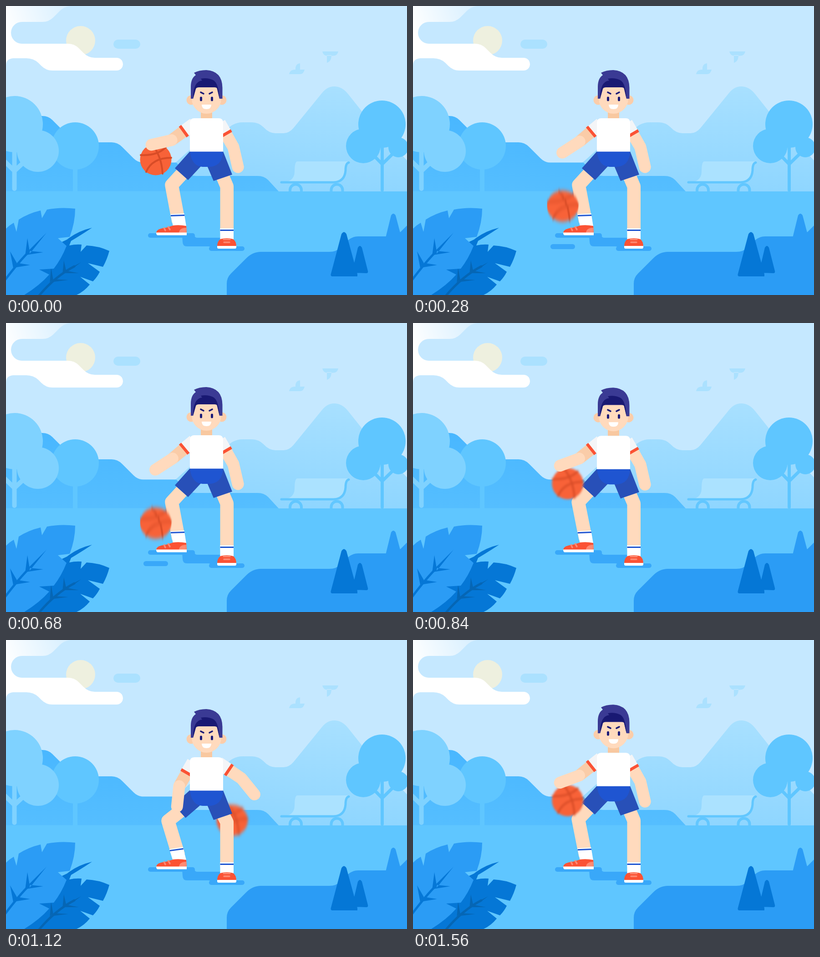
These frames come from a looping animation (881x636 px, 1600 ms). An HTML page:

```html
<!DOCTYPE html>
<html lang="en">
<head>
<meta charset="utf-8">
<title>Dribble</title>
<style>
  html, body { margin: 0; width: 100%; height: 100%; overflow: hidden; background: #c5e8ff; }
  svg { display: block; width: 100%; height: 100%; }
  .line { fill: none; stroke-linecap: round; stroke-linejoin: round; }
  .leg { fill: none; stroke: #ffdabd; stroke-width: 29.5; stroke-linejoin: round; }
</style>
</head>
<body>
<svg viewBox="0 0 881 636">
  <defs>
    <linearGradient id="haze" gradientUnits="userSpaceOnUse" x1="0" y1="50" x2="140" y2="0">
      <stop stop-color="#fff"/><stop offset="1" stop-color="#fff" stop-opacity=".3"/>
    </linearGradient>
    <linearGradient id="far" gradientUnits="userSpaceOnUse" x1="0" y1="177" x2="0" y2="407">
      <stop stop-color="#a8e0ff"/><stop offset="1" stop-color="#8fd6ff"/>
    </linearGradient>
    <linearGradient id="near" gradientUnits="userSpaceOnUse" x1="0" y1="242" x2="0" y2="407">
      <stop stop-color="#49b7ff"/><stop offset="1" stop-color="#55beff"/>
    </linearGradient>
    <filter id="smear" x="-40%" y="-40%" width="180%" height="180%" color-interpolation-filters="sRGB">
      <feGaussianBlur id="blur" stdDeviation="0"/>
    </filter>
  </defs>

  <!-- sky -->
  <path fill="#c5e8ff" d="M0 0H881V636H0Z"/>
  <circle cx="164" cy="76" r="32" fill="#eef0df"/>
  <path fill="url(#haze)" d="M0 0H141Q127 2 118 11L104 25Q94 35 80 35H35A24 24 0 0 0 11 59H0Z"/>
  <path fill="#fff" d="M0 59H11A24 24 0 0 0 35 83H137Q150 83 160 93L170 103Q181 114 195 114H243A14 14 0 0 1 243 142H102Q88 142 78 132L71 125Q60 115 45 115H16Q0 116 0 131Z"/>
  <g fill="#abe1ff">
    <rect x="236" y="74" width="59" height="20" rx="10"/>
    <path d="M622 150Q624 140 634 140H656Q654 150 645 150ZM636 142V136Q637 127 646 126V142Z"/>
    <path d="M695 100H730Q728 109.500 719 109.500H705Q697 109 695 100ZM705 108V125Q715 122 715 108Z"/>
  </g>

  <!-- hills -->
  <path fill="url(#far)" d="M330 407V380L372 345L410 311L486 271Q500 256 520 256H540Q555 256 566 267Q578 280 592 280H610Q622 280 632 268L693 193Q705 177 721 177Q738 177 751 193L782 232L881 340V407Z"/>
  <path fill="url(#near)" d="M0 242H80Q93 242 102 251L118 267L150 300H232Q245 300 255 310L280 335Q289 344.500 302 344.500H374L396 365Q405 374 418 374H553Q567 374 576 383L599 408H0Z"/>
  <path fill="#5fc6ff" d="M0 407.500H881V636H0Z"/>

  <!-- trees -->
  <g fill="#5fc6ff" stroke="none">
    <circle cx="152" cy="308" r="52"/><path d="M147 350H157V408H147Z"/>
    <circle cx="826" cy="260" r="52"/><circle cx="785" cy="308" r="38"/><circle cx="862" cy="311" r="22"/>
  </g>
  <path class="line" stroke="#5fc6ff" stroke-width="7" stroke-linejoin="miter" d="M826.500 312V405M805 326L826.500 348L849 326"/>
  <g fill="#7fd2ff"><circle cx="19" cy="260" r="62"/><circle cx="70" cy="319" r="46"/></g>
  <path class="line" stroke="#7fd2ff" stroke-width="10" d="M18.500 315V402M-4 341L18.500 363L42 341"/>

  <!-- bench -->
  <path fill="#abe2ff" d="M640 342H755Q748 345 748 357Q747 386 724 387H613Q633 385 634 365Q634 342 640 342Z"/>
  <g class="line" stroke="#62c7ff">
    <path stroke-width="5" d="M605 388H720Q744 387 746 362Q746 346 753 344.500"/>
    <path stroke-width="6" stroke-linecap="butt" d="M624 408V405A12.500 12.500 0 0 1 649 405V408M714.500 408V405A12.500 12.500 0 0 1 739.500 405V408"/>
  </g>

  <!-- foreground right -->
  <g fill="#2b9cf5">
    <path d="M834 510L846 461Q851 453 856 461L869 510Z"/>
    <path d="M485 636V611Q485 598 494 589L528 555Q542 541 560 541H710Q726 541 736 531L750 517Q760 507 774 507H842Q857 507 867 497L881 483V636Z"/>
  </g>
  <path fill="#0577d6" d="M714 589L737 502Q742.500 493 748 502L772 590V595H718Q712 595 714 589ZM760 587L773 532Q777.500 524 782 532L795 583Q796 588 792 588Z"/>

  <!-- foreground left -->
  <path fill="#0577d6" d="M40 636L100 530L134 514Q158 495 189 488Q165 504 143 517L139 527Q152 524 166 525L164 541L177 527Q203 528 227 539Q222 558 213 574L180 566L206 585Q200 597 191 606L163 596L184 613Q172 628 155 636Z"/>
  <path class="line" stroke="#0566b5" stroke-width="5" d="M72 638Q108 595 150 573"/>
  <path fill="#0566b5" d="M96 612L99 575L104 604ZM124 591L127 560L133 586ZM96 608L137 603L106 601ZM127 588L160 588L135 583ZM140 577L165 564L150 575Z"/>
  <path fill="#2b9cf5" d="M0 490Q8 482 17 477L23 497L28 470Q50 456 76 450L79 467L90 448Q120 442 152 446Q152 476 140 508L114 511L133 528Q122 556 105 578L73 580L95 591Q74 615 40 636H0Z"/>
  <path class="line" stroke="#0577d6" stroke-width="5" d="M-3 604Q28 563 50 541"/>
  <path fill="#0577d6" d="M46 542L89 499L53 544ZM16 577L9 540L24 566ZM42 550L47 511L52 540ZM17 576L53 570L28 566ZM44 548L82 542L52 539Z"/>

  <!-- ground shadows -->
  <g fill="#39a8f9">
    <rect x="312" y="500" width="103" height="10" rx="5"/>
    <path d="M387 505H414Q415 510 420 510H475V534H452Q450 529 444 529H398Q388 529 388 519Z"/>
    <rect x="446" y="529" width="78" height="10" rx="5"/>
    <rect id="ballShadow" y="524" height="11" rx="5.500"/>
  </g>

  <!-- left leg -->
  <path class="leg" id="legL"/>
  <g id="sockL">
    <path fill="#fff" d="M361.500 458L391.500 456.500L396 485H367Z"/>
    <path fill="#1f55d1" d="M361.800 460L392 459L392.400 462L362.200 463Z"/>
  </g>
  <path fill="#fb5234" d="M330 499Q331 491 345 489Q357 487 367 483Q381 481 396 484L397 499Z"/>
  <path fill="#fe8a72" d="M380 499Q381 488 396.500 488V499Z"/>
  <path class="line" stroke="#fe8a72" stroke-width="3.500" d="M347.500 488.500L350 494M356.500 486L360 492"/>
  <path fill="#fff" d="M330 498.500H397V504.500H333Q330 504 330 498.500Z"/>
  <g class="body"><path id="shortsL" fill="#2850b8" d="M404 320L371 357L400 383L428 353V320Z"/></g>

  <g id="ball"><g filter="url(#smear)">
    <circle r="34.500" fill="#f86238"/>
    <path class="line" stroke="#d84c27" stroke-width="4" stroke-linecap="butt" d="M-8 -33Q13 -7 15 31M-33 -10Q3 -8 22 -27M-21 27Q-8 -4 34 -4"/>
  </g></g>

  <!-- right leg -->
  <path class="leg" id="legR"/>
  <path fill="#fff" d="M470.500 489H500V515H470.500Z"/>
  <path fill="#1f55d1" d="M470.500 492H500V495H470.500Z"/>
  <path fill="#fb5234" d="M464 529Q464 518 471 513Q485 509 499 513Q506 518 506 529Z"/>
  <path class="line" stroke="#fe8a72" stroke-width="3.500" d="M478 513.500H492M479 520H491"/>
  <path fill="#fff" d="M464 528H506V531Q506 534 503 534H467Q464 534 464 531Z"/>

  <g class="body">
    <path fill="#2850b8" d="M477 320L497 371L456 385L442 352V320Z"/>
    <path fill="#1f55d1" d="M404 320H477Q475 354 445 354H432Q408 353 404 320Z"/>
    <g id="armL" transform="translate(408 263)"></g>
    <g id="armR" transform="translate(472 263) scale(-1 1)"></g>
    <path fill="#fff" d="M404 320.500V257Q404 247 414 247H467Q477 247 477 257V320.500Z"/>

    <!-- head -->
    <path fill="#f8c8a0" d="M428 230H453V247H428Z"/>
    <g fill="#fbcdaa"><circle cx="407" cy="207" r="10.500"/><circle cx="474" cy="207" r="10.500"/></g>
    <path fill="#ffdabd" d="M408 172H473V204A32.500 33 0 0 1 408 204Z"/>
    <path fill="#3a3a94" d="M406 204V178Q406 159 417 152L413 147Q424 141 440 141Q475 143 475.500 180V204H469L463 179H418L411 204Z"/>
    <path fill="#191973" d="M411 204Q411 166 431 164L428 160Q442 157 455 163Q467 169 469 204L464 182Q463 179 458 179H424Q419 179 417 182Z"/>
    <path class="line" stroke="#1b1b78" stroke-width="3.600" d="M428 190L434 193M447 193L453 190"/>
    <g fill="#1b1b78"><rect x="426" y="199.500" width="5" height="10" rx="2.500"/><rect x="450" y="199.500" width="5" height="10" rx="2.500"/></g>
    <path fill="#fff" d="M430 217H451Q451 227 440.500 227Q430 227 430 217Z"/>
  </g>
</svg>
<script>
  const LOOP = 1600, STEP = 40, BEAT = 400;
  const $ = id => document.getElementById(id);
  const set = (id, name, value) => $(id).setAttribute(name, value);
  const ease = p => p * p * (3 - 2 * p);
  const mix = (a, b, p) => a + (b - a) * p;

  // 0 at the top of each bounce, 1 on the ground
  const fall = t => 1 - Math.abs((t % BEAT) / (BEAT / 2) - 1);

  function ballAt(time) {
    const t = (time + LOOP) % LOOP, e = ease(fall(t));
    if (t < 800) return [329, mix(338, 496, e)];
    const rightSide = t >= 1000 && t < 1400;
    return rightSide ? [mix(532, 432, e), mix(348, 487, e)] : [mix(329, 432, e), mix(338, 487, e)];
  }

  function buildArm(id, upperSkin) {
    $(id).innerHTML = `<g id="${id}Upper">
      <path fill="#f4f5f7" d="M-14 -6H14V20H-14Z"/>
      <path fill="${upperSkin}" d="M-13.500 22H13.500L13 56H-13Z"/>
      <path fill="#fb5234" d="M-14.500 18H14.500V24.500H-14.500Z"/>
      <g id="${id}Fore"><path class="line" stroke="#ffdabd" stroke-width="26" d="M0 0V45"/></g>
    </g>`;
  }

  function poseArm(id, upper, fore) {
    set(id + 'Upper', 'transform', `rotate(${upper})`);
    set(id + 'Fore', 'transform', `translate(0 55) rotate(${fore - upper})`);
  }

  function draw(t) {
    const p = fall(t), e = ease(p);
    const crouch = t < 800 ? 0 : t >= 1000 && t < 1400 ? 1 : e;
    const reach = t >= 1000 && t < 1400 ? 1 - e : 0;

    const [x, y] = ballAt(t), [x0, y0] = ballAt(t - 8), [x1, y1] = ballAt(t + 8);
    set('ball', 'transform', `translate(${x} ${y})`);
    set('blur', 'stdDeviation', `${Math.abs(x1 - x0) * .25} ${Math.abs(y1 - y0) * .25}`);

    const width = t < 800 && p > 0 ? 24 + 50 * p : 0;
    set('ballShadow', 'x', 329 - width / 2);
    set('ballShadow', 'width', width);

    if (t < 800) poseArm('armL', mix(54, 48, e), mix(77, 46, e));
    else poseArm('armL', mix(54, 30, crouch), mix(77, 6, crouch));
    poseArm('armR', mix(30, 70, reach), mix(13, 53, reach));

    for (const g of document.querySelectorAll('.body')) g.setAttribute('transform', `translate(0 ${11 * crouch})`);
    set('shortsL', 'transform', `rotate(${6 * crouch} 420 330)`);
    set('sockL', 'transform', `rotate(${-6 * crouch} 381 485)`);
    set('legL', 'd', `M${397 - 3 * crouch} ${358 + 10 * crouch}L${364 - 8 * crouch} ${394 + 4 * crouch}L379 474`);
    set('legR', 'd', `M470 ${361 + 10 * crouch}L485.3 ${397 + 4 * crouch}V500`);
  }

  buildArm('armL', '#facca8');
  buildArm('armR', '#ffdabd');
  const start = performance.now();
  function tick() {
    const t = (performance.now() - start) % LOOP;
    draw(Math.floor(t / STEP) * STEP);
    requestAnimationFrame(tick);
  }
  tick();
</script>
</body>
</html>
```
